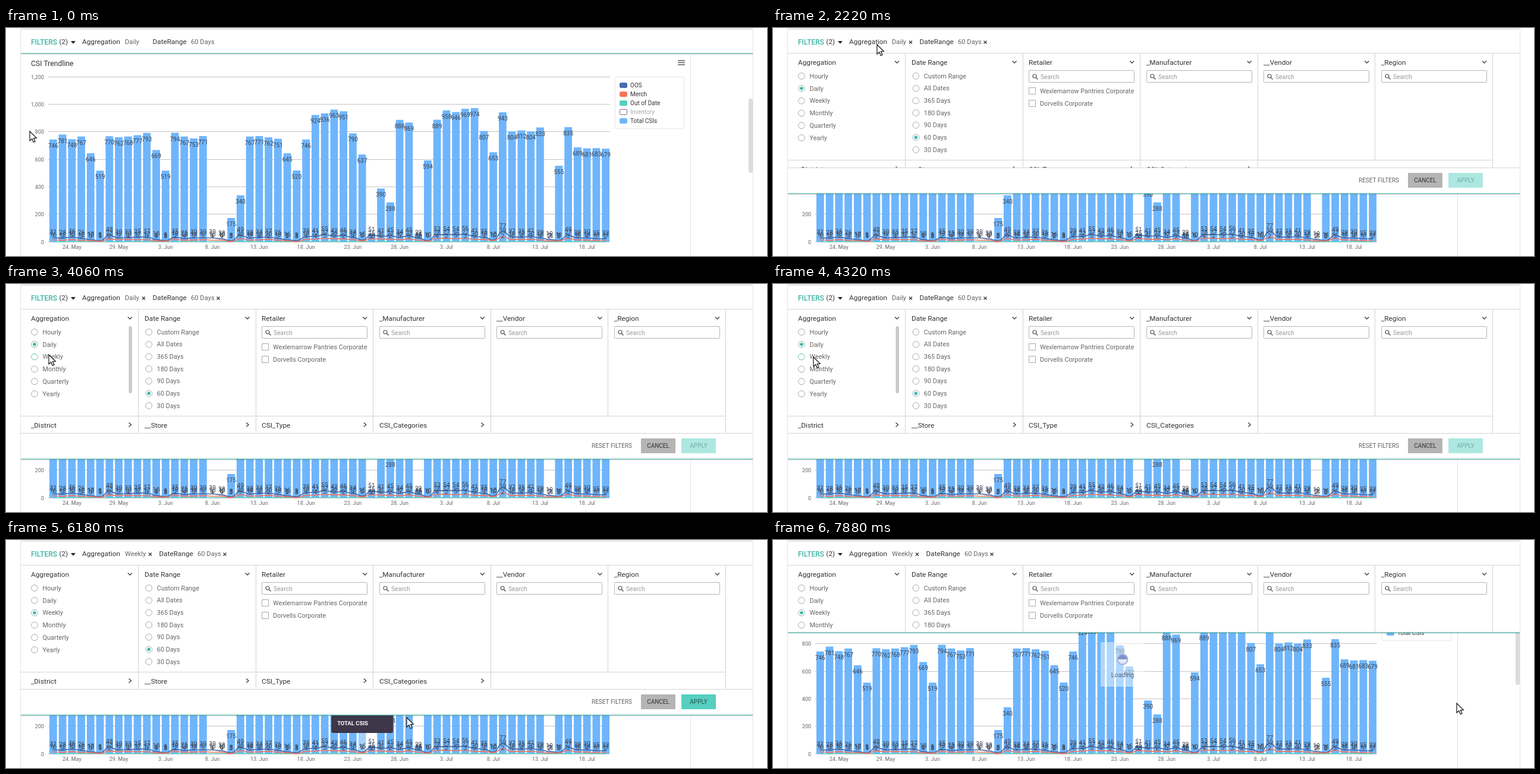
These frames come from a looping animation (1280x384 px, 8000 ms). An HTML page with a canvas:

```html
<!DOCTYPE html>
<html lang="en">
<head>
<meta charset="utf-8">
<title>Dashboard filters</title>
<style>
html, body { margin: 0; width: 100%; height: 100%; overflow: hidden; background: #fff; }
canvas { display: block; }
</style>
</head>
<body>
<canvas id="stage" width="1280" height="384"></canvas>
<script>
const ctx = document.getElementById('stage').getContext('2d');
const TEAL = '#3db5a5', DARK = '#333', GRAY = '#666', RULE = '#d4d4d4';
const STEP = 131.33, LOOP = 8000, LAST = 60;
const HEAD = 43, OPEN = 295, FOOT = 43;

// Each week has a level; the days repeat a weekday rhythm with a little noise and a few outages.
const noise = n => { const s = Math.sin(n * 12.9898) * 43758.5453; return s - Math.floor(s) - .5; };
const series = rule => Array.from({ length: 60 }, (_, i) => Math.round(rule(i, i % 7)));
const weekLevel = [765, 775, 755, 765, 940, 870, 960, 820, 690];
const level = i => weekLevel[Math.floor(i / 7)];
const outage = { 17: 4, 18: 4, 19: 175, 20: 340, 34: 58, 35: 390, 36: 288, 39: 58, 53: 14 };
const totals = series((i, day) =>
  outage[i] ?? level(i) * (day === 5 ? .68 : day === 4 ? .85 : 1) * (1 + .05 * noise(i)));
const oos = series((i, day) =>
  31 * (level(i) / 765) ** 2 * (day === 5 ? .28 : day === 4 ? .65 : day === 6 ? 1.35 : 1) * (1 + .4 * noise(i + 99)));
const merch = series(i => Math.max(3, Math.min(48, oos[i] * .5) + 5 * noise(i + 200)));
const outdated = series(i => 3 + 5 * noise(i + 300));

// Pointer path: step, x, y
const path = [[3, 40, 174], [10, 175, 28], [20, 175, 28], [22, 164, 38], [29, 72, 119], [31, 72, 119],
  [33, 68, 123], [36, 66, 125], [43, 66, 125], [47, 674, 299], [50, 1139, 305], [55, 1150, 275]];

const slotX = i => 71.5 + 15.75 * (i + .5);
const valueY = v => 360.5 - v * .2316;
const clamp = u => Math.max(0, Math.min(1, u));

function text(s, x, y, size = 11, color = GRAY, align = 'left', weight = 400) {
  ctx.font = `${weight} ${size}px Roboto, sans-serif`;
  ctx.fillStyle = color;
  ctx.textAlign = align;
  ctx.textBaseline = 'middle';
  ctx.fillText(s, x, y + .5);
}
function box(x, y, w, h, color, r = 0) {
  ctx.fillStyle = color;
  ctx.beginPath();
  ctx.roundRect(x, y, w, h, r);
  ctx.fill();
}
function frame(x, y, w, h, color, r = 0) {
  ctx.strokeStyle = color;
  ctx.lineWidth = 1;
  ctx.beginPath();
  ctx.roundRect(x + .5, y + .5, w - 1, h - 1, r);
  ctx.stroke();
}
function poly(color, width, ...points) {
  ctx.strokeStyle = color;
  ctx.lineWidth = width;
  ctx.beginPath();
  points.forEach(([x, y]) => ctx.lineTo(x, y));
  ctx.stroke();
}
function circle(x, y, r, fill, stroke, width = 1) {
  ctx.beginPath();
  ctx.arc(x, y, r, 0, 7);
  if (fill) { ctx.fillStyle = fill; ctx.fill(); }
  if (stroke) { ctx.strokeStyle = stroke; ctx.lineWidth = width; ctx.stroke(); }
}
function clipTo(bottom, draw) {
  ctx.save();
  ctx.beginPath();
  ctx.rect(0, 0, 1280, bottom);
  ctx.clip();
  draw();
  ctx.restore();
}
function cross(x) {
  poly(DARK, 1.2, [x - 2.5, 21.5], [x + 2.5, 26.5]);
  poly(DARK, 1.2, [x - 2.5, 26.5], [x + 2.5, 21.5]);
}

function spline(values, color) {
  ctx.strokeStyle = color;
  ctx.lineWidth = 1.6;
  ctx.beginPath();
  values.forEach((v, i) => {
    const x = slotX(i), y = valueY(v), mid = x - 7.9;
    if (i) ctx.bezierCurveTo(mid, valueY(values[i - 1]), mid, y, x, y);
    else ctx.moveTo(x, y);
  });
  ctx.stroke();
}

function chart(menu, hovered) {
  box(1151, 44, 1, 340, '#e2e2e2');
  text('CSI Trendline', 42, 60, 12.2, DARK);
  if (menu) for (const y of [54, 57.5, 61]) box(1130, y, 12, 1.6, '#666');
  for (let v = 0; v <= 1200; v += 200) {
    const y = Math.round(valueY(v)) - 1;
    box(71, y, 945, 1, '#c4c4c4');
    text(v.toLocaleString('en-US'), 64, y + 1, 9, GRAY, 'right');
  }
  totals.forEach((v, i) => {
    const y = valueY(v);
    box(slotX(i) - 6.4, y, 12.8, 360 - y, i === hovered ? '#a5d0fb' : '#6fb5fb');
  });
  spline(outdated, '#5ad0c3');
  spline(oos, '#4765a5');
  spline(merch, '#f5735a');
  const labels = (values, dy) => values.forEach((v, i) =>
    text(v.toLocaleString('en-US'), slotX(i), Math.min(351, valueY(v) + dy), 10, '#3b4250', 'center'));
  labels(totals, 10.5);
  for (const values of [oos, merch, outdated]) labels(values, -9.5);
  for (let i = 0; i < 12; i++) {
    const day = new Date(2021, 4, 24 + 5 * i);
    text(`${day.getDate()}. ${day.toLocaleString('en-US', { month: 'short' })}`, slotX(2 + 5 * i), 369, 9, GRAY, 'center');
  }

  frame(1024, 82, 117, 88, '#e6e6e6', 2);
  [['OOS', '#4a6baf'], ['Merch', '#fb7559'], ['Out of Date', '#56cfc1'], ['Inventory'], ['Total CSIs', '#6fb5fb']]
    .forEach(([name, color], i) => {
      const y = 96.5 + 15 * i;
      if (color) box(1032, y - 4.5, 13, 9, color, 2.5);
      else frame(1032, y - 5, 13, 10, '#6a6478', 2.5);
      text(name, 1050, y, 10, color ? DARK : '#aaa');
    });
  box(1249, 119, 7, 125, '#dcdcdc', 3);
}

function tooltip(slot) {
  box(slotX(slot) - 52, 280, 104, 45, '#3e3649', 3);
  text('TOTAL CSIS', slotX(slot) - 42, 309, 9.5, '#fff', 'left', 700);
}

function loading(k) {
  box(551, 172, 74, 75, 'rgba(255,255,255,.45)', 2);
  ctx.save();
  ctx.translate(588, 201);
  ctx.rotate((k - LAST) * .8);
  circle(0, 0, 8.5, '#e3eaf7', '#9fb2d8', 2);
  ctx.beginPath();
  ctx.arc(0, 0, 7.5, Math.PI, 0);
  ctx.fillStyle = '#7d93c4';
  ctx.fill();
  ctx.restore();
  text('Loading', 588, 227, 10.8, '#53627c', 'center');
}

function radios(names, x, pitch, selected, hovered) {
  names.forEach((name, i) => {
    const y = 81 + pitch * i, on = name === selected;
    circle(x, y, 5.3, '#fff', name === hovered ? '#5cc4b5' : on ? '#8fb5b0' : '#aaa');
    if (on) circle(x, y, 2.7, TEAL);
    text(name, x + 13.5, y, 10.9);
  });
}

function panelBody(weekly, x, y) {
  const edge = i => 222 + 197.6 * i;
  const left = i => i ? Math.round(edge(i - 1) + 10.6) : 42;
  box(25, 222, 1186, 1, RULE);
  ['Aggregation', 'Date Range', 'Retailer', '_Manufacturer', '__Vendor', '_Region'].forEach((name, i) => {
    const c = edge(i) - 13.5, x0 = left(i);
    box(Math.round(edge(i)), HEAD, 1, i === 4 ? 180 : 209, RULE);
    text(name, x0, 58, 11.8, DARK);
    poly('#444', 1.4, [c - 3.5, 55.5], [c, 59], [c + 3.5, 55.5]);
    if (i < 2) return;
    frame(x0, 71, 178, 21, '#b4b4b4', 1);
    circle(x0 + 10, 81, 3, null, '#555', 1.2);
    poly('#555', 1.4, [x0 + 12.3, 83.3], [x0 + 15.5, 86.5]);
    text('Search', x0 + 20, 82, 10.3, '#999');
  });
  ['_District', '__Store', 'CSI_Type', 'CSI_Categories'].forEach((name, i) => {
    const c = edge(i) - 13.5;
    text(name, left(i), 238, 11.8, DARK);
    poly('#444', 1.4, [c - 2, 233.5], [c + 2, 237], [c - 2, 240.5]);
  });
  const periods = ['Hourly', 'Daily', 'Weekly', 'Monthly', 'Quarterly', 'Yearly'];
  const hovered = x > 40 && x < 120 && periods[Math.round((y - 81) / 20.8)];
  radios(periods, 48, 20.8, weekly ? 'Weekly' : 'Daily', hovered);
  radios(['Custom Range', 'All Dates', '365 Days', '180 Days', '90 Days', '60 Days', '30 Days'], 240.3, 20.65, '60 Days');
  ['Wexlemarrow Pantries Corporate', 'Dorvells Corporate'].forEach((name, i) => {
    frame(430, 100 + 21 * i, 12, 12, '#aaa');
    text(name, 449, 106 + 21 * i, 10.8);
  });
  if (x < 222 && y > 48 && y < 222) box(206.5, 71, 5.5, 113, '#c9c9c9', 2.7);
}

function footer(top, active) {
  box(25, top, 1231, FOOT, '#fff');
  box(25, top - 1, 1231, 1, RULE);
  text('RESET FILTERS', 985, top + 21, 10);
  box(1068, top + 8, 58, 25, '#b5b5b5', 1);
  text('CANCEL', 1097, top + 21, 10, DARK, 'center');
  box(1136, top + 8, 58, 25, active ? '#56cfc1' : '#ade8e0', 1);
  text('APPLY', 1165, top + 21, 10, active ? '#27514c' : '#73a8a1', 'center');
}

function header(weekly, open) {
  const shift = weekly ? 11 : 0;
  text('FILTERS', 42, 23.5, 12, TEAL, 'left', 500);
  text('(2)', 89.5, 23.5, 11.5, DARK);
  ctx.fillStyle = '#222';
  ctx.beginPath();
  ctx.moveTo(109, 22);
  ctx.lineTo(117, 22);
  ctx.lineTo(113, 26.5);
  ctx.fill();
  text('Aggregation', 128, 23.5, 11.8, DARK);
  text(weekly ? 'Weekly' : 'Daily', 200, 23.5, 11.2);
  text('DateRange', 246.5 + shift, 23.5, 11.8, DARK);
  text('60 Days', 311 + shift, 23.5, 11.2);
  if (open) [231.5, 357].forEach(x => cross(x + shift));
}

function pointer(x, y) {
  ctx.beginPath();
  [[0, 0], [0, 16], [3.8, 12.6], [6.3, 18.5], [9, 17.3], [6.5, 11.6], [11.3, 11.3]]
    .forEach(([dx, dy]) => ctx.lineTo(x + dx, y + dy));
  ctx.closePath();
  ctx.fillStyle = '#fff';
  ctx.fill();
  ctx.strokeStyle = '#111';
  ctx.lineWidth = 1.2;
  ctx.stroke();
}

function pointerAt(k) {
  const next = path.findIndex(p => p[0] > k);
  if (next === 0) return path[0].slice(1);
  if (next < 0) return path[path.length - 1].slice(1);
  const [k0, x0, y0] = path[next - 1], [k1, x1, y1] = path[next], u = (k - k0) / (k1 - k0);
  return [x0 + (x1 - x0) * u, y0 + (y1 - y0) * u];
}

function panelBottom(k) {
  const opened = 1 - (1 - clamp((k - 15) / 3.33)) ** 3;
  const closed = .5 - .5 * Math.cos(Math.PI * clamp((k - 58.375) / 3.05));
  return Math.round(HEAD + (OPEN - HEAD) * opened * (1 - closed));
}

function render(k) {
  const [x, y] = pointerAt(k), bottom = panelBottom(k);
  const weekly = k >= 39, open = bottom > HEAD, closing = k >= 59;
  const hovered = k >= 47 && k <= 50 ? 33 + 6 * (k - 47) : -1;

  box(0, 0, 1280, 384, '#fff');
  chart(y > HEAD, hovered);
  if (hovered >= 0) tooltip(hovered);
  if (closing) loading(k);

  box(25, 2, 1231, bottom - 2, '#fff');
  if (open) {
    const footTop = closing ? OPEN - FOOT : bottom - FOOT;
    clipTo(bottom, () => {
      clipTo(footTop, () => panelBody(weekly, x, y));
      if (footTop > HEAD) footer(footTop, weekly);
    });
    box(25, 42, 1231, 1, RULE);
  }
  header(weekly, open);
  box(25, bottom - 1, 1231, 1.6, '#6cc5b9');
  box(25, bottom + .6, 1231, 1.4, 'rgba(0,0,0,.12)');
  box(25, 1, 1231, 1.5, '#d9d9d9');
  box(24, 2, 1, 382, '#e4e4e4');
  box(1256, 2, 1, 382, '#e4e4e4');

  if (k === 15 || k === 38 || k === 58) circle(x + 1, y + 1.5, 27, null, '#f08080', 3);
  pointer(x, y);
}

function tick() {
  const time = performance.now() % LOOP;
  render(Math.min(LAST, Math.floor((time + 16) / STEP)));
  requestAnimationFrame(tick);
}
tick();
</script>
</body>
</html>
```
